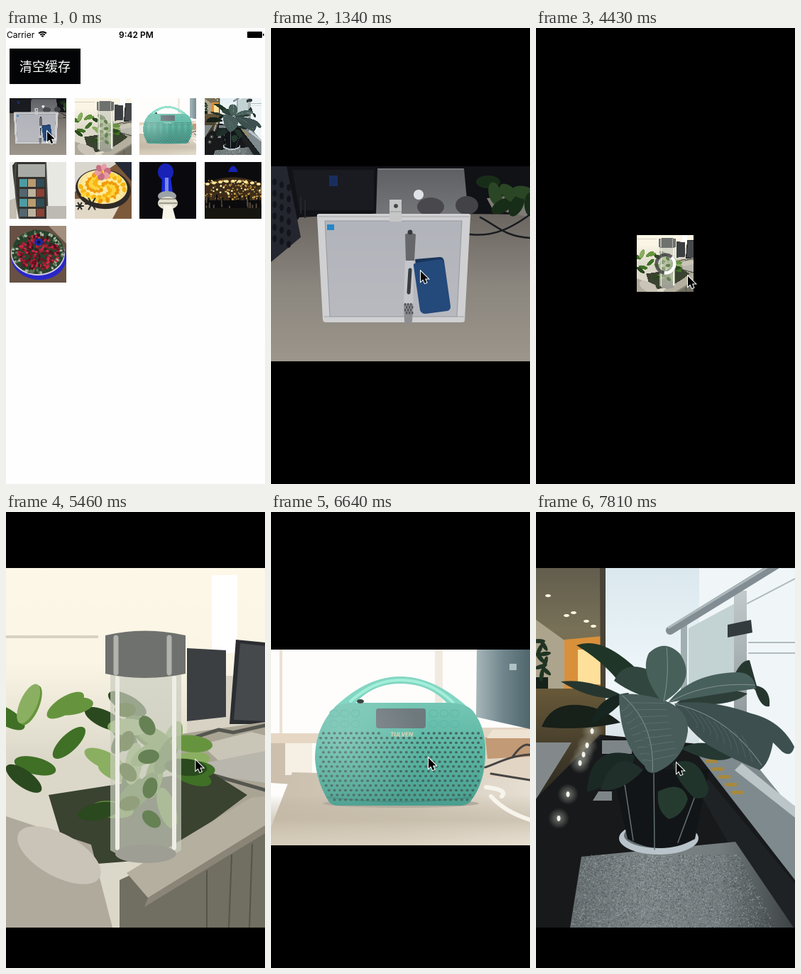
An HTML page with a canvas for the animation above (8000 ms loop, 365 by 643 pixels).

```html
<!DOCTYPE html>
<html lang="zh">
<head>
<meta charset="utf-8">
<title>Photo browser</title>
<style>
html, body { margin: 0; width: 100%; height: 100%; overflow: hidden; background: #000; }
canvas { display: block; width: 365px; height: 643px; }
</style>
</head>
<body>
<canvas id="stage" width="365" height="643"></canvas>
<script>
const W = 365, H = 643, LOOP = 8000, TAU = Math.PI * 2;
const stage = document.getElementById('stage').getContext('2d');
let c = stage;

// ---- drawing helpers, all painting on the current context c ----
const fill = (color, path) => { c.fillStyle = color; c.fill(new Path2D(path)); };
const line = (color, width, path) => {
  c.strokeStyle = color; c.lineWidth = width; c.stroke(new Path2D(path));
};
const rect = (color, x, y, w, h) => { c.fillStyle = color; c.fillRect(x, y, w, h); };
const oval = (color, x, y, rx, ry = rx, turn = 0) => {
  c.fillStyle = color; c.beginPath(); c.ellipse(x, y, rx, ry, turn, 0, TAU); c.fill();
};
const blend = (g, colors) => {
  colors.forEach((color, i) => g.addColorStop(i / (colors.length - 1), color));
  return g;
};
const fade = (y0, y1, ...colors) => blend(c.createLinearGradient(0, y0, 0, y1), colors);
const sweep = (x0, x1, ...colors) => blend(c.createLinearGradient(x0, 0, x1, 0), colors);
const glow = (x, y, r, ...colors) => blend(c.createRadialGradient(x, y, 0, x, y, r), colors);
const text = (str, x, y, font, color, align = 'left') => {
  c.font = font; c.fillStyle = color; c.textAlign = align; c.fillText(str, x, y);
};
const seeded = seed => () => (seed = (seed * 16807) % 2147483647) / 2147483647;
function picture(w, h, paint) {
  const canvas = document.createElement('canvas');
  canvas.width = w * 2; canvas.height = h * 2;
  c = canvas.getContext('2d');
  c.scale(2, 2);
  c.lineCap = 'round';
  paint(seeded(77));
  c = stage;
  return { canvas, w, h };
}
// Centre-crops a picture into a box.
function cover({ canvas, w: pw, h: ph }, x, y, w, h) {
  const s = Math.max(w / pw, h / ph), sw = w / s, sh = h / s;
  c.drawImage(canvas, pw - sw, ph - sh, sw * 2, sh * 2, x, y, w, h);
}

// ---- the photographs ----
const whiteboard = picture(365, 275, () => {
  rect('#101216', 0, 0, 365, 275);
  fill('#191b20', 'M30 5H145V62H40Z');
  rect('#182f5e', 82, 13, 12, 15);
  fill(fade(65, 275, '#6b6660', '#8b867e', '#9c968c'), 'M40 72L160 66L365 68V275H0V128Z');
  fill('#24262f', 'M0 0H22L42 100L0 135Z');
  for (let i = 0; i < 18; i++) oval('#14151c', 5 + i % 3 * 10, 22 + (i / 3 | 0) * 16 + i % 3 * 4, 3, 5);
  fill(fade(0, 70, '#5d5f63', '#75777a'), 'M150 3H272L278 68H148Z');
  line('#8f9195', 1, 'M151 4H271');
  oval('#dfe3e8', 208, 40, 7);
  oval('#48484d', 225, 57, 19, 13);
  oval('#434347', 276, 55, 16, 13);
  fill('#7d7b77', 'M304 45L365 38V72L312 60Z');
  for (let i = 0; i < 7; i++) oval(i % 2 ? '#2b4624' : '#182d18', 306 + i * 10, 30 + i * 17 % 35 - 8, 17, 9, i * 1.3);
  line('#191b20', 2.5, 'M365 68C340 86 315 100 280 96M365 101C330 99 320 85 295 72');
  line('#24262b', 2, 'M48 72V48M42 66V44');
  fill('#d0d0d2', 'M68 67H278Q282 67 281 71L273 217Q273 220 269 220H78Q74 220 73 217L65 71Q64 67 68 67Z');
  line('#a5a6aa', 1, 'M67 71H279M75 212H272');
  fill(fade(77, 212, '#b2b4bb', '#b9bac0'), 'M76 77H269L262 212H83Z');
  line('#9698a0', 1, 'M76 77H269L262 212H83Z');
  rect('#2587c6', 79, 82, 10, 8);
  fill('#c6c6c7', 'M167 47H184V78H167Z');
  line('#999', 1, 'M167 64H184');
  oval('#45464a', 176, 56, 3);
  fill('#c4c6cb', 'M189 132H202L200 196H187Z');
  fill('#66676b', 'M189 96Q196 92 204 96L202 133H190Z');
  oval('#38393d', 196, 93, 3.5);
  fill('#8d8e92', 'M187 194H200L199 219Q193 226 188 219Z');
  for (let i = 0; i < 12; i++) rect('#55565a', 188 + i % 3 * 4 + (i / 3 | 0) % 2 * 2, 193 + (i / 3 | 0) * 4, 2.4, 3.5);
  line('#393b42', 5, 'M196 146L194 178');
  fill('#183459', 'M203 131L238 128Q243 128 244 134L253 198L215 206Z');
  fill('#24497b', 'M205 136L238 131Q243 131 244 136L253 198Q253 203 248 204L218 208Q212 208 210 203L201 141Q200 137 205 136Z');
});

const bottle = picture(365, 507, rnd => {
  rect(fade(0, 270, '#fdf8e7', '#faf5e5', '#dcd8c9'), 0, 0, 365, 507);
  rect('#fff', 290, 10, 36, 110);
  rect('#d6d2c4', 0, 95, 130, 4);
  rect('#d7d2c3', 255, 152, 110, 80);
  fill('#3c3f42', 'M255 113L310 116V210L255 216Z');
  fill('#2b2d30', 'M324 101L365 105V220L315 220Z');
  fill('#45494c', 'M330 106L365 110V216L321 214Z');
  fill('#a9a494', 'M240 235L365 217V330L240 380Z');
  fill('#c9c5b7', 'M275 249L345 231L365 236V262L300 272Z');
  fill('#b9b6ad', 'M265 278L365 258V303L290 292Z');
  line('#55564f', 5, 'M268 238L300 228L320 232L365 222M285 290L365 313');
  fill('#3a4230', 'M60 320L285 285L340 320L220 410L90 420Z');
  for (let i = 0; i < 34; i++) {
    const x = rnd() * 265, y = 190 + rnd() * 155;
    oval(['#3f7026', '#66943e', '#2b491e', '#8baf61'][i % 4], x, y, 30, 12, rnd() * 3);
  }
  fill('#b0aa9c', 'M0 350L120 390L150 507H0Z');
  oval('#c9c4b7', 75, 405, 65, 30, .5);
  fill('#716f62', 'M160 507V440L365 345V507Z');
  fill('#b4af9f', 'M170 430L345 324L365 322V363L200 465Z');
  fill('#8a8576', 'M200 465L365 363V374L195 478Z');
  line('#565448', 2, 'M283 427V507M318 405L314 507M347 390L343 507');
  c.globalAlpha = .7;
  fill('#cbcdbf', 'M147 145H247V398Q195 427 147 398Z');
  c.globalAlpha = 1;
  for (let i = 0; i < 8; i++) oval(i % 2 ? '#668154' : '#929f7c', 168 + i * 31 % 60, 200 + i * 22, 15, 10, i);
  line('#eeeee6', 6, 'M157 155V395M237 155V395');
  fill('#6f716e', 'M140 95Q195 82 253 95V149Q195 161 140 149Z');
  line('#b2b3ad', 7, 'M155 98V148M230 98V148');
  oval('#9f9e94', 197, 403, 43, 13);
});

const radio = picture(365, 276, () => {
  rect('#fefdfb', 0, 0, 365, 276);
  rect('#ece2d2', 12, 0, 4, 130);
  rect('#f0eae0', 231, 0, 11, 90);
  rect('#e6d7c4', 0, 118, 75, 14);
  fill('#cdbfae', 'M0 132H55V180L30 190L0 188Z');
  rect('#f6efe4', 20, 132, 38, 45);
  fill('#e3d5c3', 'M280 110H365V190H280Z');
  fill('#c29a75', 'M302 124L365 121V151L305 154Z');
  fill('#efe3d4', 'M312 113H365V125H304Z');
  fill(sweep(288, 365, '#a9b9bc', '#71878d', '#4f666d'), 'M290 0H365V112L289 95Z');
  rect('#afc2c5', 336, 20, 10, 9);
  fill(sweep(0, 365, '#cbc0ae', '#d3c9b9', '#e6dfd2'), 'M30 173L365 182V276H0V250Z');
  fill(fade(205, 276, '#b3a99800', '#c3b8a5aa', '#e8dfcf66'), 'M0 205H365V276H0Z');
  oval('#b3ab9d', 183, 217, 110, 6);
  line('#464443', 3, 'M365 148C335 150 320 160 302 166M340 152Q355 130 365 135M310 175L365 184');
  line('#f7f4ec', 6, 'M303 194Q335 198 325 207M310 207Q330 229 365 240');
  fill('#83d6c3', 'M90 81Q135 38 182 38Q230 38 278 82L251 79Q225 48 182 48Q141 48 115 80Z');
  line('#a4efda', 4, 'M112 73Q145 43 182 43Q225 43 257 75');
  const body = 'M92 79Q105 75 125 75H250Q275 75 285 87Q304 112 302 149Q301 188 282 213Q278 220 265 220H95Q84 220 80 212Q64 185 62 154Q62 109 92 79Z';
  fill(fade(75, 220, '#74c6b4', '#59b5a2', '#4a9f8f'), body);
  line('#449083', 2, 'M79 208Q180 221 284 208');
  oval('#394443', 126, 73, 5, 3);
  for (let i = 0; i < 6; i++) for (const x of [89, 229]) {
    c.strokeStyle = '#61b6a5'; c.lineWidth = 1; c.beginPath();
    c.ellipse(x + i % 3 * 15, 90 + (i / 3 | 0) * 15, 6, 5, 0, 0, TAU); c.stroke();
  }
  fill('#6e797e', 'M151 83H215Q218 83 218 87V107Q218 111 214 111H152Q148 111 148 107V87Q148 83 151 83Z');
  for (let row = 0; row < 15; row++) {
    const y = 118 + row * 6.7, half = 115 - Math.max(0, (y - 165) / 47) ** 2 * 19;
    for (let x = 66 + row % 2 * 3.9; x < 300; x += 7.8)
      if (Math.abs(x - 182) < half && !(row < 1 && x > 155 && x < 211)) oval('#45675f', x, y, 2, 1.7);
  }
  fill(glow(100, 130, 110, '#ffffff38', '#ffffff00'), body);
  text('TULVEN', 184, 122.5, 'italic bold 8px Inter, sans-serif', '#e8d3b3', 'center');
});

const plant = picture(365, 507, rnd => {
  rect(fade(0, 330, '#dbe8ee', '#f0f8fb', '#bdcbd1'), 0, 0, 365, 507);
  rect(fade(0, 170, '#625d4d', '#787158', '#7d6940'), 0, 0, 97, 250);
  fill('#aca48d', 'M0 73L43 104V170L0 178Z');
  fill('#d9903b', 'M40 101L94 96V176L40 171Z');
  rect('#ffe09a', 59, 115, 32, 49);
  fill('#474338', 'M90 0H98V185H91Z');
  for (const [x, y] of [[17, 39], [53, 63], [43, 67], [71, 75], [81, 82]]) oval('#fff8df', x, y, 4, 2);
  rect('#15221a', 0, 154, 17, 35);
  for (let i = 0; i < 9; i++) oval('#203423', 4 + i * 7 % 13, 103 + i * 6, 9, 3, i);
  fill('#f0f6f8', 'M230 0H365V335H230Z');
  fill('#c3d2d3', 'M215 85L280 50V180H215Z');
  rect('#a1afb3', 204, 80, 9, 110);
  rect(fade(0, 300, '#cbd2d4', '#788385'), 279, 32, 18, 265);
  line('#b1bbbd', 2, 'M300 105H365M300 120H365M298 50L365 15');
  line('#818d92', 12, 'M189 88L338 -4');
  line('#adb8bc', 3, 'M187 84L334 -6');
  fill('#333b3e', 'M270 80L303 73L305 91L270 98Z');
  rect(fade(170, 507, '#685939', '#24231f', '#111315'), 0, 170, 98, 337);
  fill('#17191b', 'M0 325L90 235L250 250L365 430V507H0Z');
  fill('#83898b', 'M0 246H50L0 326Z');
  fill('#7d8588', 'M93 243H135V262L93 262ZM80 328L88 315H107V328Z');
  fill('#7e8a8e', 'M220 253L300 265L365 345V440Z');
  fill('#bcc6c9', 'M290 275L365 336V352L280 285Z');
  fill('#1f2224', 'M212 285L245 300L365 445V507H340Z');
  for (let i = 0; i < 5; i++) rect('#a7893e', 239 + i * 9, 270 + i * 11, 17, 5);
  fill(sweep(50, 363, '#666e70', '#7d8587', '#747c7e', '#3d4345'), 'M64 407L281 386L363 507H48Z');
  for (let i = 0; i < 5000; i++) {
    const v = rnd(), y = 404 + v * 102;
    rect(i % 2 ? '#30353766' : '#d0d8da55', 65 - v * 16 + rnd() * (220 + v * 70), y, 1.2, 1.2);
  }
  for (const [x, y] of [[32, 353], [45, 319], [62, 275], [67, 263], [72, 250], [79, 230]]) {
    rect(glow(x, y, 15, '#c9cabb88', '#c9cabb00'), x - 15, y - 15, 30, 30);
    oval('#f4f5ee', x, y, 2.5, 4);
  }
  oval('#b9c4ca', 173, 381, 56, 23);
  oval('#626c71', 173, 377, 49, 18);
  fill('#121517', 'M107 284H244L224 382Q175 408 129 382Z');
  line('#657074', 1.5, 'M125 305L137 384M166 290L167 397M224 322L200 387');
  const leaves = [
    ['#172019', 'M8 224Q22 187 68 194Q96 198 119 218Q64 230 8 224Z'],
    ['#26362f', 'M35 160Q78 155 126 182Q83 190 35 160Z'],
    ['#172520', 'M78 220Q85 180 131 176Q113 204 78 220Z'],
    ['#1b2924', 'M72 316Q75 246 139 264Q138 297 72 316Z'],
    ['#202f2a', 'M91 312Q111 250 151 285Q120 318 91 312Z'],
    ['#20342c', 'M193 276Q230 260 243 311Q242 328 223 324Q197 300 193 276Z'],
    ['#263b30', 'M172 315Q207 298 214 326Q206 350 187 354Q169 342 172 315Z'],
    ['#263832', 'M205 255Q235 235 282 263Q260 282 205 255Z'],
    ['#1f3527', 'M57 109Q84 99 117 122Q153 147 178 187Q139 178 115 158Q92 130 57 109Z'],
    ['#31463e', 'M110 159Q125 125 171 149L180 188Q140 181 110 159Z'],
    ['#48605a', 'M178 190Q145 148 159 120Q181 99 203 121Q229 160 178 190Z'],
    ['#26372f', 'M280 150Q290 129 301 130L311 166Q331 170 329 195Q317 198 309 172Z'],
    ['#2c3e37', 'M198 190Q240 160 298 177Q272 199 198 190Z'],
    ['#48605c', 'M186 190Q218 148 285 147Q307 148 310 170Q249 178 186 190Z'],
    ['#3d504f', 'M195 191Q245 184 303 205Q345 215 364 252Q360 268 347 259L334 246Q329 276 315 285Q276 269 243 250Q208 224 195 191Z'],
    ['#485d5a', 'M117 178Q150 175 184 188Q215 201 214 230Q209 270 170 288Q157 292 153 279Q117 248 117 178Z']
  ];
  leaves.forEach(([color, path]) => fill(color, path));
  line('#80908a', 1, 'M122 180Q168 220 164 287M180 188Q188 150 184 112M196 192Q270 208 318 278M188 189Q240 160 308 165');
  for (let i = 0; i < 9; i++) {
    line('#627671', .7, `M${132 + i * 4} ${192 + i * 10}Q${122 + i * 3} ${205 + i * 8} ${120 + i * 4} ${200 + i * 9}`);
    line('#627671', .7, `M${134 + i * 4} ${190 + i * 10}Q${178 + i * 3} ${190 + i * 9} ${182 + i * 2} ${191 + i * 9}`);
    line('#536964', .7, `M${210 + i * 10} ${196 + i * 5}Q${235 + i * 8} ${225 + i * 3} ${225 + i * 10} ${225 + i * 6}`);
  }
});

const rack = picture(80, 80, () => {
  rect('#e8e8e3', 0, 0, 80, 80);
  fill('#c3beb1', 'M0 54L10 50V80H0Z');
  fill('#34322f', 'M8 0H51L54 80H15Q6 38 4 5Z');
  rect('#a8aaa6', 12, 3, 38, 18);
  for (let i = 0; i < 12; i++)
    rect(['#4c9ca4', '#8a4032', '#bdb29e', '#53666f', '#304c57', '#b99b70'][i * 5 % 6], 14 + i % 3 * 12, 24 + (i / 3 | 0) * 14, 11, 11);
  line('#504e49', 2, 'M9 0Q5 35 14 80M51 0L54 80');
  rect('#bcbab2', 52, 62, 28, 18);
});
const cake = picture(80, 80, rnd => {
  rect('#7c593b', 0, 0, 80, 80);
  fill('#d9d6cd', 'M0 0H62L0 42Z');
  fill('#242936', 'M56 0H80V27Z');
  fill('#e2d8c6', 'M0 52L70 48L53 80H0Z');
  oval('#302a27', 40, 38, 39, 28, .12);
  oval('#f5e4a0', 39, 35, 35, 24, .1);
  for (let i = 0; i < 80; i++) {
    const a = i * 2.4, r = Math.sqrt(i / 80);
    oval(['#f7b613', '#ffd43c', '#f09b09', '#ffe99b'][i % 4], 39 + Math.cos(a) * r * 32, 35 + Math.sin(a) * r * 21, 4, 3, rnd() * 3);
  }
  for (let i = 0; i < 9; i++) oval(i % 2 ? '#e79ca5' : '#c86e82', 39 + Math.cos(i) * 7, 14 + Math.sin(i) * 7, 5, 4, i);
  for (const [x, y, r] of [[7, 62, 5], [24, 59, 9]])
    for (let a = 0; a < 3; a++) {
      const dx = Math.cos(a * TAU / 6) * r, dy = Math.sin(a * TAU / 6) * r;
      line('#292c28', 2, `M${x - dx} ${y - dy}L${x + dx} ${y + dy}`);
    }
});
const tower = picture(80, 80, () => {
  rect('#0a0a0e', 0, 0, 80, 80);
  oval('#1822b7', 37, 14, 11, 12);
  fill('#1a27dd', 'M32 22H44L48 50H31Z');
  fill('#788ce0', 'M36 22H41V50H36Z');
  oval('#9da2a8', 39, 48, 13, 7);
  oval('#e4e0cf', 40, 58, 14, 9);
  fill('#f7f5e9', 'M34 61H46L51 80H32Z');
  line('#59564c', 1, 'M27 52H52M28 58H53');
});
const carousel = picture(80, 80, rnd => {
  rect('#0b0b0e', 0, 0, 80, 80);
  fill('#1821b5', 'M33 14Q40 -3 47 14Z');
  fill('#3c2c19', 'M0 31Q40 12 80 31V54H0Z');
  for (let i = 0; i < 130; i++) oval(i % 3 ? '#c99743' : '#fff0a5', rnd() * 80, 26 + rnd() * 27, .5 + rnd());
  for (let i = 0; i < 9; i++) oval('#ffe79b', 4 + i * 9, 31 - 4 * Math.sin(i / 8 * Math.PI), 3, 2);
  for (let i = 0; i < 36; i++) rect(i % 3 ? '#0b0b0c' : '#544838', rnd() * 80, 45 + rnd() * 17, 2, 10);
  rect('#17150f', 0, 65, 80, 15);
});
const roses = picture(80, 80, rnd => {
  rect('#675144', 0, 0, 80, 80);
  fill('#a28f7d', 'M55 0H80V25Z');
  oval('#2926c9', 41, 44, 39, 32, .1);
  oval('#d7cbe6', 40, 39, 38, 31);
  oval('#28432d', 40, 37, 37, 31);
  for (let i = 0; i < 300; i++) {
    const a = rnd() * TAU, r = Math.sqrt(rnd());
    const color = r > .83 ? ['#a9b8a2', '#263d2b', '#5c7551'][i % 3] : ['#a71b32', '#6f1021', '#c92944', '#41151c'][i % 4];
    oval(color, 40 + Math.cos(a) * r * 36, 37 + Math.sin(a) * r * 30, 2.2, 1.5, a);
  }
  oval('#1729a9', 41, 23, 6, 5);
  oval('#0c144f', 41, 23, 2.5);
});

const photos = [whiteboard, bottle, radio, plant];
const album = [...photos, rack, cake, tower, carousel, roses];

// ---- motion: the picture advances in even steps; keys are [step, value...] ----
const STEP = 147.1, GAP = 420, CX = 182.5, CY = 332.5, THUMB = 80;
const scrollKeys = [[9, 0], [10, 30], [11, 170], [12, 335], [13, 408], [14, 419], [15, 420],
  [37, 420], [38, 530], [39, 700], [40, 815], [41, 840],
  [44, 840], [45, 870], [46, 1000], [47, 1180], [48, 1250], [49, 1260]];
const growKeys = [
  [[4, 0], [5, .3], [6, .9], [7, 1]],
  [[32, 0], [33, .28], [34, .85], [35, 1]],
  [[41, 0], [42, .55], [43, 1]],
  [[48, 0], [49, .3], [50, .9], [51, 1]]
];
const flyKeys = [[0, 0], [1, .35], [2, .9], [3, 1]];
const cursorKeys = [[0, 58, 146], [3, 58, 146], [7, 211, 343], [8, 285, 350], [9, 285, 350],
  [13, 199, 350], [26, 199, 350], [28, 214, 350], [33, 222, 350], [36, 290, 350], [37, 290, 350],
  [39, 156, 350], [40, 150, 350], [43, 222, 347], [44, 290, 350], [48, 150, 353], [51, 198, 354]];

function track(keys, k, n = 1) {
  const j = keys.findIndex(key => key[0] > k);
  if (j === 0) return keys[0][n];
  if (j < 0) return keys[keys.length - 1][n];
  const a = keys[j - 1], b = keys[j];
  return a[n] + (b[n] - a[n]) * (k - a[0]) / (b[0] - a[0]);
}

function grid() {
  rect('#fefefe', 0, 0, W, H);
  text('Carrier', 1, 13.5, '12px Inter, sans-serif', '#000');
  text('9:42 PM', 183.5, 13.5, '600 12px Inter, sans-serif', '#000', 'center');
  for (const r of [3, 6, 9]) {
    c.strokeStyle = '#000'; c.lineWidth = 2;
    c.beginPath(); c.arc(51.5, 13.5, r - 1, -2.3, -.84); c.stroke();
  }
  fill('#000', 'M341 5H360Q361 5 361 6V13Q361 14 360 14H341Q340 14 340 13V6Q340 5 341 5ZM362 8H363.5V11H362Z');
  rect('#030405', 5, 29, 100, 50);
  text('清空缓存', 55, 61, '18px "Noto Sans CJK SC", "Noto Sans CJK", sans-serif', '#fff', 'center');
  album.forEach((photo, i) => cover(photo, Math.round(5 + i % 4 * 275 / 3), 99 + (i / 4 | 0) * 90, THUMB, THUMB));
}

function spinner(x, k) {
  const start = (k - 13) * TAU / 8 - .05;
  const ring = (color, from, to) => {
    c.strokeStyle = color; c.lineWidth = 4.6;
    c.beginPath(); c.arc(x, CY, 12.8, from, to); c.stroke();
  };
  ring('rgba(62,60,66,.8)', 0, TAU);
  ring('#fff', start, start + 2.55);
}

function browser(k) {
  rect('#000', 0, 0, W, H);
  const fly = track(flyKeys, k);
  if (fly < 1) {
    cover(whiteboard, 5 + (CX - 45) * fly, 99 + (CY - 139) * fly, THUMB, THUMB);
    return;
  }
  const scroll = track(scrollKeys, k);
  photos.forEach((photo, i) => {
    const grow = track(growKeys[i], k), x = CX + i * GAP - scroll;
    const w = THUMB + (photo.w - THUMB) * grow, h = THUMB + (photo.h - THUMB) * grow;
    if (Math.abs(x - CX) > (W + w) / 2) return;
    cover(photo, Math.floor(x - w / 2), Math.floor(CY - h / 2), w, h);
    if (!grow) spinner(x, k);
  });
}

function cursor(x, y) {
  c.save();
  c.translate(x, y);
  const arrow = 'M0 0V14.5L3.4 11.4L5.8 17L8.3 15.9L6 10.5H10.6Z';
  line('#fff', 2, arrow);
  fill('#000', arrow);
  c.restore();
}

function draw(now) {
  const t = now % LOOP;
  const k = t < 450 ? 0 : Math.min(51, 1 + Math.floor((t - 450) / STEP));
  if (k) browser(k); else grid();
  cursor(track(cursorKeys, k, 1), track(cursorKeys, k, 2));
  requestAnimationFrame(draw);
}
draw(0);
</script>
</body>
</html>
```
